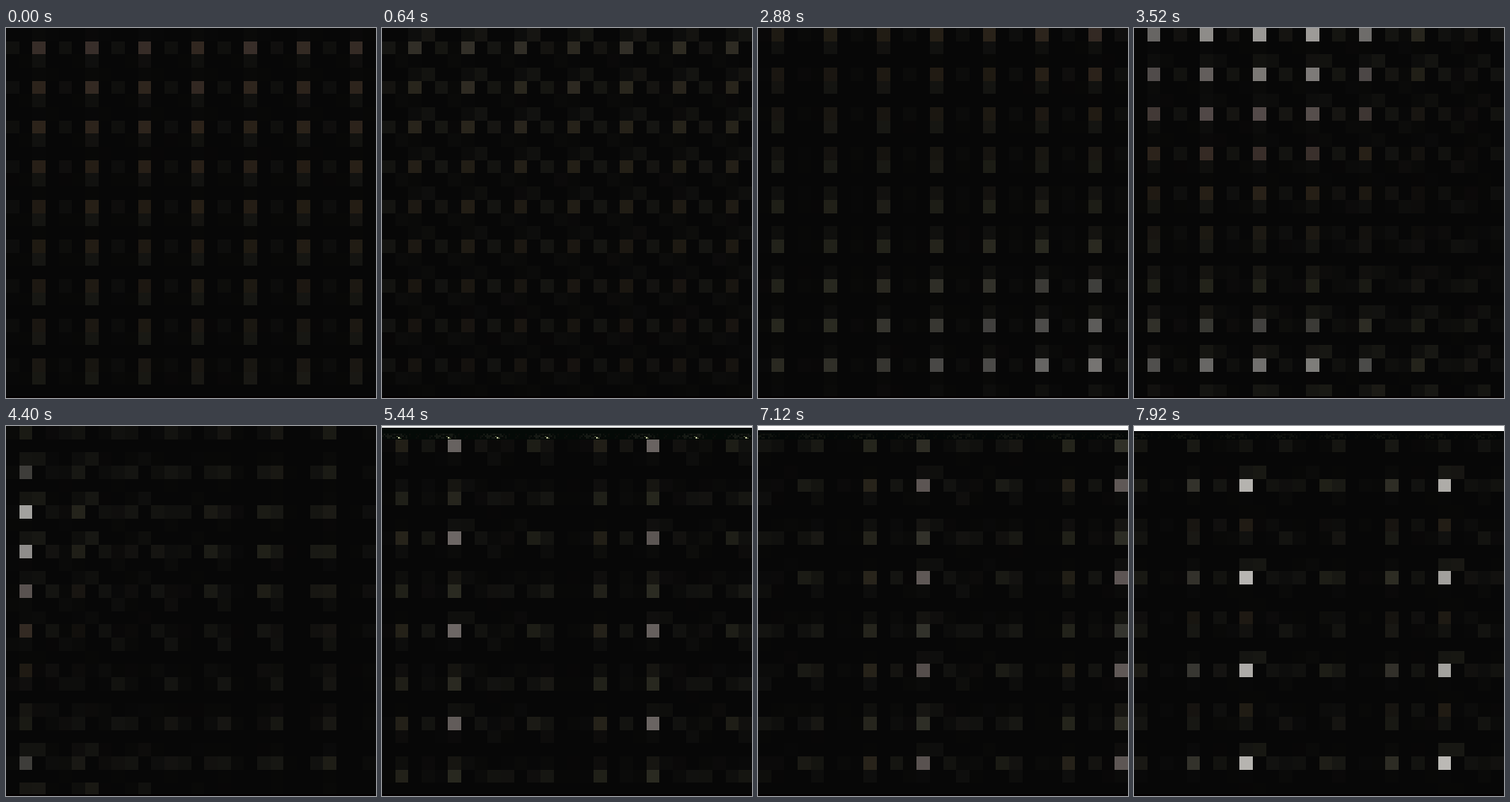
Animation, 439 px wide and 439 px high, one loop 8 s. Source, as an HTML page with a canvas:

```html
<!DOCTYPE html>
<html lang="en">
<head>
<meta charset="utf-8">
<title>Mosaic drift</title>
<style>
  html, body { margin: 0; width: 100%; height: 100%; overflow: hidden; background: #070707; }
  canvas { display: block; width: 439px; height: 439px; }
</style>
</head>
<body>
<canvas id="stage" width="439" height="439"></canvas>
<script>
const SIZE = 439, CELLS = 28, CELL = SIZE / CELLS;
const LOOP = 8000, STEP = 80, ZOOM_START = 4400, STRIP_START = 5040;
const ctx = document.getElementById('stage').getContext('2d');

// faint marks of the repeated tile, each twice as tall as wide
const MARKS = [
  { x: -0.22, y: 0, amp: 31, w: 0.3 },
  { x: 0.22, y: 0.1, amp: 10, w: 0.16 },
  { x: -0.7, y: 0.4, amp: 11, w: 0.25 },
  { x: -1.52, y: -0.1, amp: 24, w: 0.18 },
  { x: -1.95, y: -0.2, amp: 14, w: 0.23 },
  { x: 1.08, y: -1, amp: 19, w: 0.15 },
  { x: 0, y: -1, amp: 14, w: 0.15 }
];

const wrap = (d, period) => d - period * Math.round(d / period);
const bell = x => Math.exp(-x * x);
const mix = (a, b, k) => a + (b - a) * k;
const clamp = k => Math.min(1, Math.max(0, k));
const edge = i => Math.round(i * CELL);

function hash(x, y) {
  const n = Math.sin(x * 127.1 + y * 311.7) * 43758.5453;
  return n - Math.floor(n);
}

// tile periods and the place of one highlight, in cells: steady drift, then a short zoom
function poseAt(t) {
  const sec = t / 1000;
  const slow = Math.min(1, t / ZOOM_START);
  const zoom = clamp((t - ZOOM_START) / (STRIP_START - ZOOM_START));
  return {
    px: mix(4 - 0.09 * slow ** 3, 3.755, zoom),
    py: mix(3.03 + 0.113 * slow ** 2, 3.5, zoom),
    cx: 14.1 - 0.32 * sec + 0.16 * zoom,
    cy: 13.47 - 0.28 * sec - 0.22 * zoom
  };
}

// sharp highlight, with a longer tail to the left and upwards
function highlight(dx, dy) {
  const fx = dx < 0 ? bell(dx / 0.14) : Math.exp(-((dx / 0.095) ** 3));
  const fy = dy < 0 ? Math.exp(-((-dy / 0.29) ** 1.4)) : Math.exp(-((dy / 0.16) ** 1.5));
  return 160 * fx * fy;
}

function cellColor(col, row, { px, py, cx, cy }) {
  const x = col - cx, y = row - cy;
  const dx = wrap(x, px), dy = wrap(y, py);
  let light = highlight(dx, dy);
  for (const m of MARKS) {
    light += m.amp * bell(wrap(x - m.x, px) / m.w) * bell(wrap(y - m.y, py) / (2 * m.w));
  }
  const v = 7 + light * mix(0.9, 1.1, hash(col, row));
  const olive = bell((v - 34) / 20);
  const warm = bell((dx + 0.05) / 0.3) * bell((dy + 0.4) / 0.24) * bell((v - 36) / 70);
  const g = v * (0.99 - 0.2 * warm);
  const b = v * (0.97 - 0.22 * olive - 0.2 * warm);
  return `rgb(${Math.round(v)},${Math.round(g)},${Math.round(b)})`;
}

function drawStrip(t, { px, cx }) {
  const k = (t - STRIP_START) / (LOOP - STRIP_START);
  const top = Math.round(mix(1.25, 6.2, k));
  const period = px * CELL, origin = cx * CELL;
  ctx.fillStyle = `rgb(4,${Math.round(10 - 3 * k)},7)`;
  ctx.fillRect(0, top, SIZE, 16 - top);

  // fine grain, repeated with the tile
  for (let x = 0; x < SIZE; x += 2) {
    const u = wrap(x - origin, period);
    for (let y = 9; y < 15; y += 2) {
      const n = hash(Math.round(u / 2), y);
      if (n > 0.55 * bell((u + 6) / 16) + 0.12) continue;
      const v = 9 + n * 38 * (1 - 0.5 * k);
      ctx.fillStyle = `rgb(${Math.round(v * 0.85)},${Math.round(v)},${Math.round(v * 0.8)})`;
      ctx.fillRect(x, y, 2, 2);
    }
  }

  const shine = Math.max(0, 1 - 1.5 * k);
  for (let x = origin % period - 1; x < SIZE; x += period) {
    const left = Math.round(x);
    ctx.fillStyle = `rgba(225,232,180,${shine})`;
    ctx.fillRect(left, 13, 2, 2);
    ctx.fillStyle = `rgba(130,145,95,${shine * 0.7})`;
    ctx.fillRect(left - 2, 12, 2, 1);
    ctx.fillRect(left + 2, 14, 2, 1);
  }

  ctx.fillStyle = '#fff';
  ctx.fillRect(0, 0, SIZE, top);
}

function draw(t) {
  const pose = poseAt(t);
  for (let row = 0; row < CELLS; row++) {
    for (let col = 0; col < CELLS; col++) {
      const x = edge(col), y = edge(row);
      ctx.fillStyle = cellColor(col, row, pose);
      ctx.fillRect(x, y, edge(col + 1) - x, edge(row + 1) - y);
    }
  }
  if (t >= STRIP_START) drawStrip(t, pose);
  ctx.fillStyle = '#040000';
  ctx.fillRect(0, SIZE - 2, SIZE, 2);
}

const start = performance.now();
function tick() {
  const t = (performance.now() - start) % LOOP;
  draw(Math.floor(t / STEP) * STEP);
  requestAnimationFrame(tick);
}
tick();
</script>
</body>
</html>
```
